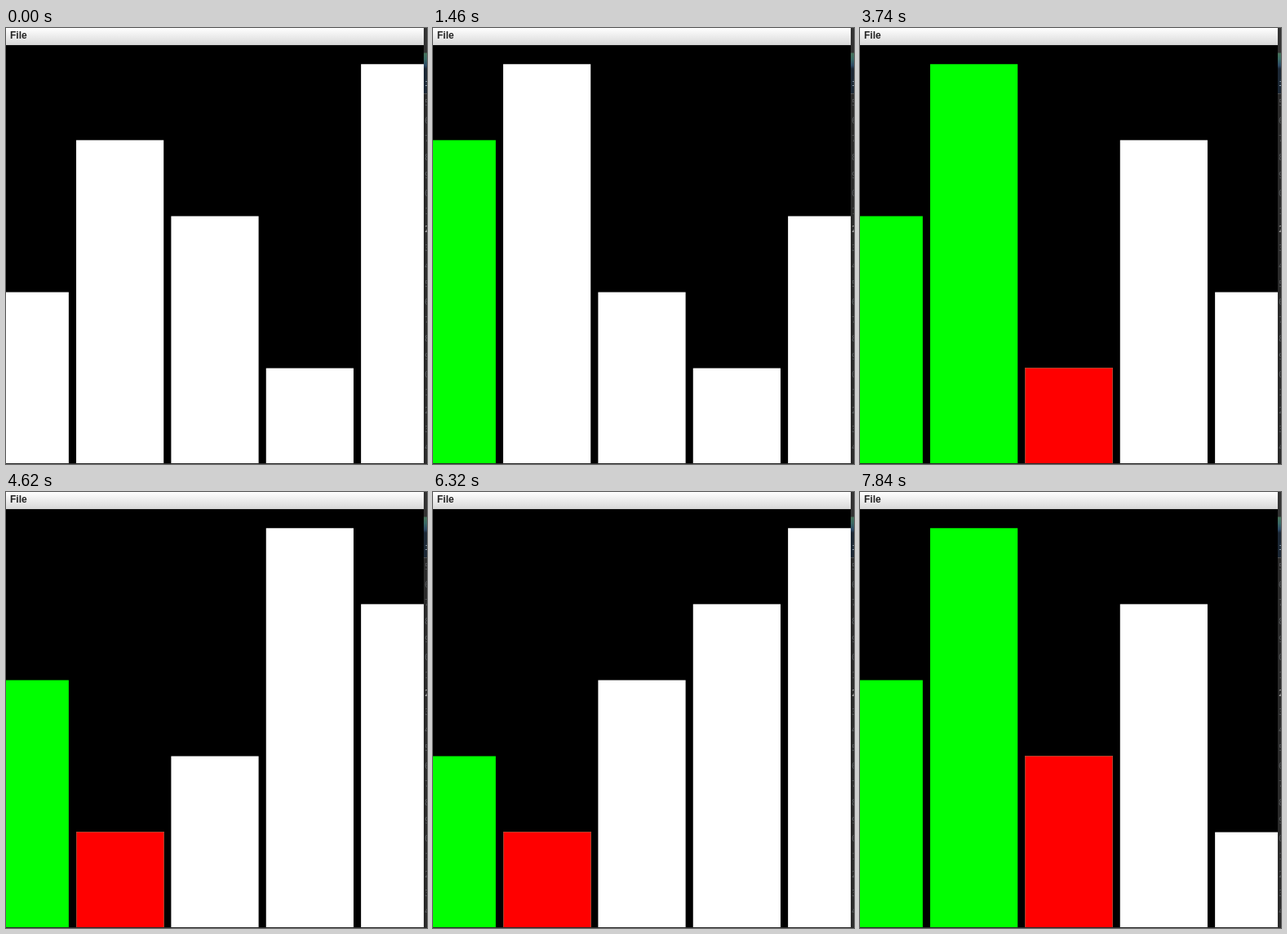
Animation, 516 px wide and 534 px high, one loop 8000 ms. Source, as an HTML page with a canvas:

```html
<!DOCTYPE html>
<html lang="en">
<head>
<meta charset="utf-8">
<title>Shuffle sort</title>
<style>
  html, body { margin: 0; width: 100%; height: 100%; overflow: hidden; background: #2b2b2b; }
  #stage { position: relative; width: 516px; height: 534px; overflow: hidden; background: #2b2b2b; }
  canvas { position: absolute; left: 0; top: 0; }
  #menu {
    position: absolute; left: 0; top: 0; width: 512px; height: 20px;
    background: linear-gradient(#fff, #dadada); border-bottom: 1px solid #ccc; box-sizing: content-box;
    font: bold 12px/18px "Liberation Sans", Arial, sans-serif; color: #222; text-indent: 5px;
  }
  #edge {
    position: absolute; left: 512px; top: 0; width: 4px; height: 534px; overflow: hidden;
    background: linear-gradient(#333 30px, #47735a 31px, #3b6b66 38px, #2d4a66 46px,
      #1c2835 50px, #1c2835 80px, #505050 80px, #505050 81px, #2b2b2b 81px);
    font: 11px/14px "DejaVu Sans Mono", monospace; color: #55585a;
  }
  #edge span { position: absolute; left: 1px; }
</style>
</head>
<body>
<div id="stage">
  <canvas id="view" width="512" height="533"></canvas>
  <div id="menu">File</div>
  <div id="edge"></div>
</div>
<script>
const LOOP = 8000;
const UNIT = 512 / 5.5, PITCH = UNIT * 1.25, WIDTH = 107.2, FLOOR = 533;

// Bar order, the time it is shuffled, then the time each bar is checked.
const rounds = [
  ['24315', 0, 30, 130, 230],
  ['42315', 460, 560, 660],
  ['51324', 890, 990, 1130],
  ['45213', 1330, 1460, 1560, 1660],
  ['42315', 1890, 1990, 2090],
  ['12534', 2320, 2420, 2520, 2650, 2750],
  ['41352', 2960, 3060, 3200],
  ['35142', 3400, 3500, 3640, 3740],
  ['52314', 3950, 4050, 4180],
  ['31254', 4380, 4480, 4620],
  ['42153', 4820, 4920, 5050],
  ['51324', 5250, 5350, 5490],
  ['53124', 5690, 5790, 5920],
  ['21345', 6120, 6220, 6320],
  ['24135', 6550, 6650, 6780, 6880],
  ['52143', 7080, 7180, 7310],
  ['35241', 7510, 7610, 7740, 7840]
];

const ctx = document.getElementById('view').getContext('2d');

function drawBar(i, value, color) {
  const x = 256 + (i - 2) * PITCH - WIDTH / 2;
  const y = FLOOR - (value + 0.25) * UNIT;
  ctx.fillStyle = color;
  if (color === '#f00') {
    // Red bars carry a dull one-pixel rim.
    const l = Math.floor(x), r = Math.ceil(x + WIDTH), t = Math.floor(y);
    ctx.fillStyle = '#b0402c';
    ctx.fillRect(l, t, r - l, FLOOR - t);
    ctx.fillStyle = color;
    ctx.fillRect(l + 1, t + 1, r - l - 2, FLOOR - t - 1);
  } else {
    ctx.fillRect(x, y, WIDTH, FLOOR - y);
  }
}

function draw(t) {
  const [order, , ...checks] = rounds.filter(r => r[1] <= t).pop();
  const checked = checks.filter(c => c <= t).length;
  ctx.fillStyle = '#000';
  ctx.fillRect(0, 0, 512, FLOOR);
  [...order].map(Number).forEach((value, i, all) => {
    const sorted = i === 0 || value > all[i - 1];
    drawBar(i, value, i >= checked ? '#fff' : sorted ? '#0f0' : '#f00');
  });
}

// Slivers of the editor window behind.
function addSliver(text, y, color) {
  const s = document.createElement('span');
  s.textContent = text;
  s.style.top = y - 7 + 'px';
  if (color) s.style.color = color;
  document.getElementById('edge').append(s);
}
addSliver('i', 68, '#a9b7c6');
for (let i = 0; i < 20; i++) addSliver((5 + i) % 10, 92 + i * 22.2, i === 7 && '#a4a3a3');

const start = performance.now();
function tick() {
  draw((performance.now() - start) % LOOP);
  requestAnimationFrame(tick);
}
tick();
</script>
</body>
</html>
```
